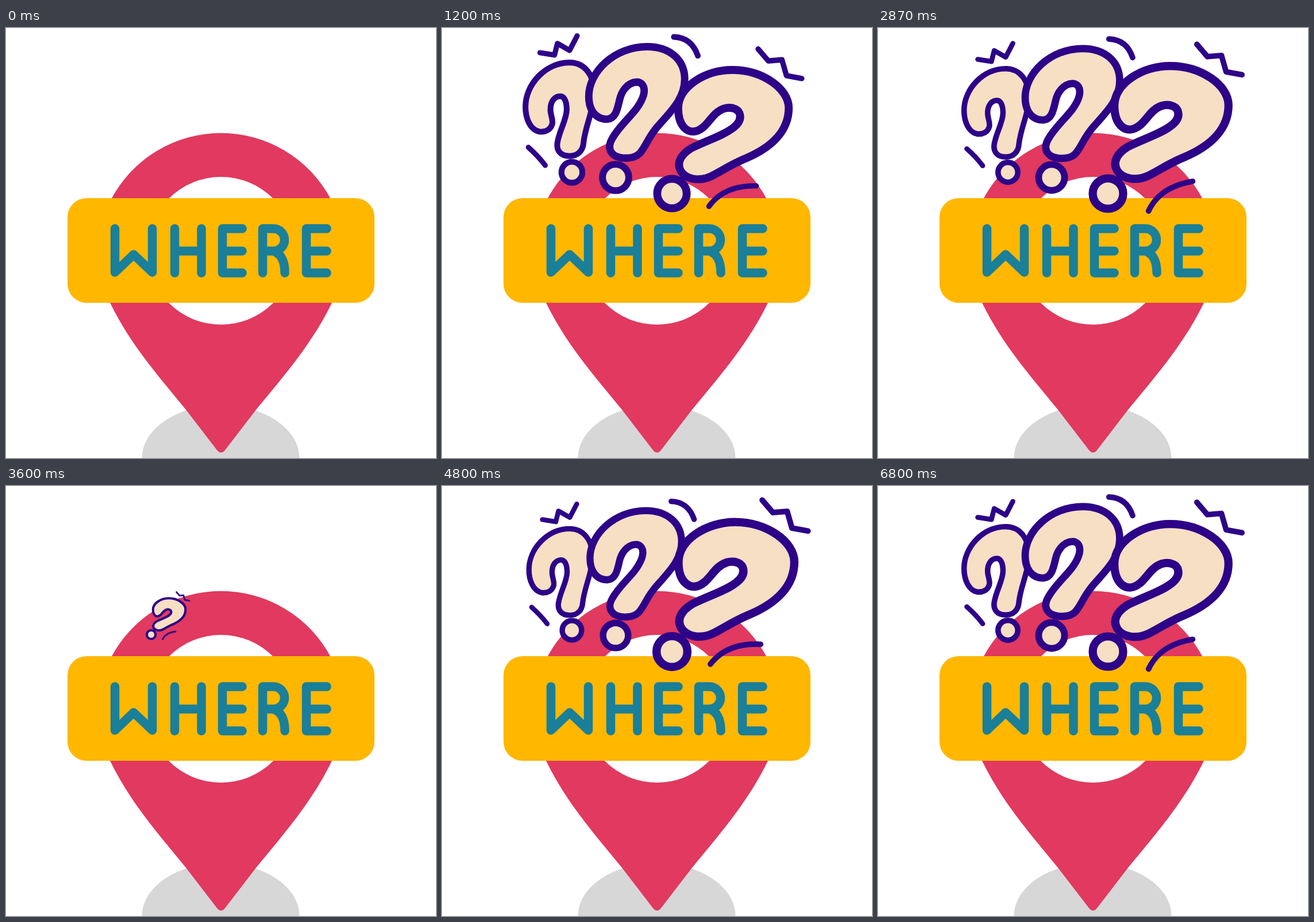
These frames come from a looping animation (748x748 px, 6.87 s). An HTML page:

```html
<!DOCTYPE html>
<html lang="en">
<head>
<meta charset="utf-8">
<title>Where</title>
<style>
html, body { margin: 0; width: 100%; height: 100%; overflow: hidden; background: #fff; }
svg { display: block; width: 100%; height: 100%; }
.ink { fill: none; stroke: #2d0388; stroke-linecap: round; stroke-linejoin: round; }
.body { fill: #f7dfc4; }
</style>
</head>
<body>
<svg viewBox="0 0 748 748">
  <ellipse cx="373.5" cy="748" rx="137" ry="92" fill="#d7d7d7"/>
  <path fill="#e1395f" d="M181 478 C160 430 160 340 184 296 A216 216 0 0 1 564 296 C588 340 588 430 567 478
    C533 548 486 602 435 664 L382 733 Q374 744 366 733 L313 664 C262 602 215 548 181 478Z"/>
  <circle cx="374" cy="387.5" r="128.5" fill="#fff"/>
  <rect x="107" y="296" width="534" height="182" rx="33" fill="#ffb700"/>
  <path role="img" aria-label="WHERE" fill="none" stroke="#1a7f99" stroke-width="15.5" stroke-linecap="round" stroke-linejoin="round"
    d="M189.5 349V425L222 394L254.5 425V349
    M293.5 349V426M340 349V426M293.5 388H340
    M411 349H376.5V426H411M376.5 388H411
    M446.5 426V349H465A19.5 19.5 0 0 1 465 388H446.5M465 388C478 392 485 405 485 426
    M558 349H522.5V426H558M522.5 388H558"/>

  <g id="left">
    <path class="ink body" stroke-width="10" d="M146 138C146 100 180 62 222 62C248 62 264 84 264 112
      C264 145 249 170 246 200C245 214 236 223 222 223C206 223 199 213 201 200C204 180 217 160 217 143
      C217 129 213 120 206 120C196 120 189 129 189 143C189 153 194 160 192 168
      C189 178 180 182 170 181C154 178 146 158 146 138Z"/>
    <circle class="ink body" stroke-width="10" cx="226" cy="251" r="18"/>
    <path class="ink" stroke-width="9" d="M171 45L196 49L201 29L222 41L235 16M151 208Q168 223 180 239"/>
  </g>
  <g id="middle">
    <path class="ink body" stroke-width="13" d="M255 118C255 75 300 31 357 31C397 31 423 54 423 88
      C423 122 398 145 378 168C358 190 356 205 344 218C334 228 313 228 301 222
      C290 215 289 204 296 192C307 172 324 158 338 140C346 129 352 118 352 108
      C352 98 346 93 339 93C322 94 312 110 309 124C305 141 302 157 287 158C267 158 255 142 255 118Z"/>
    <circle class="ink body" stroke-width="12" cx="302" cy="260" r="23"/>
    <path class="ink" stroke-width="10" d="M404 14Q435 15 446 47"/>
  </g>
  <g id="right">
    <path class="ink body" stroke-width="14" d="M411 138C411 100 458 70 506 70C560 70 606 103 606 137
      C606 178 575 207 530 226C505 236 485 250 468 258C448 267 425 263 416 249
      C407 234 416 219 434 208C462 194 490 186 508 172C520 163 522 154 519 146
      C515 137 502 135 492 138C474 144 468 160 455 171C444 180 432 182 422 172C414 164 411 150 411 138Z"/>
    <circle class="ink body" stroke-width="14" cx="400" cy="288" r="26"/>
    <path class="ink" stroke-width="9.5" d="M552 33L570 54L594 52L602 80L629 85"/>
    <path class="ink" id="swish" stroke-width="9.5" d="M-41 20Q-16 -18 41 -19"/>
  </g>
</svg>
<script>
const LOOP = 6870, STEP = 66.67, STEPS = 103, CYCLE = STEPS / 2;
const ORIGIN = { x: 215, y: 251 };
const START = 1.6, PEAK = 6.8, TRAVEL_END = 10, WAVE = 7.8, LAST_DIP = 34.1, REST = 38;

const marks = [
  { id: 'left', x: 226, y: 251, size: 0.954, delay: 3 },
  { id: 'middle', x: 302, y: 260, size: 0.979, delay: 1.5 },
  { id: 'right', x: 400, y: 288, size: 1.018, delay: 0 }
].map(m => ({ ...m, el: document.getElementById(m.id) }));
const swish = document.getElementById('swish');

const clamp = v => Math.min(1, Math.max(0, v));
const smooth = v => (1 - Math.cos(Math.PI * clamp(v))) / 2;

// Pop in, pulse as a cosine, then settle.
function scaleAt(p) {
  if (p < PEAK) return 1.061 * Math.sin(Math.PI / 2 * clamp((p - START) / (PEAK - START)));
  if (p < LAST_DIP) return 1.013 + 0.048 * Math.cos(2 * Math.PI * (p - PEAK) / WAVE);
  return 0.965 + 0.035 * smooth((p - LAST_DIP) / (REST - LAST_DIP));
}

function travelAt(p) {
  const left = 1 - clamp((p - START) / (TRAVEL_END - START));
  return 1 - left * left;
}

function draw(ms) {
  const step = Math.min(STEPS - 1, Math.floor((ms + 5) / STEP));
  const phase = step % CYCLE;

  for (const m of marks) {
    const p = phase - m.delay;
    const k = travelAt(p);
    const x = ORIGIN.x + (m.x - ORIGIN.x) * k;
    const y = ORIGIN.y + (m.y - ORIGIN.y) * k;
    const s = m.size * scaleAt(p);
    m.el.style.display = s > 0.001 ? '' : 'none';
    m.el.setAttribute('transform', `translate(${x} ${y}) scale(${s}) translate(${-m.x} ${-m.y})`);
  }

  const swing = 1 - smooth((phase - 33) / 6);
  const turn = -8.5 - 12.5 * swing * Math.cos(2 * Math.PI * (phase - 31) / 22);
  swish.setAttribute('transform', `translate(507 292) rotate(${turn})`);
}

const begin = performance.now();
function tick() {
  draw((performance.now() - begin) % LOOP);
  requestAnimationFrame(tick);
}
draw(0);
requestAnimationFrame(tick);
</script>
</body>
</html>
```
